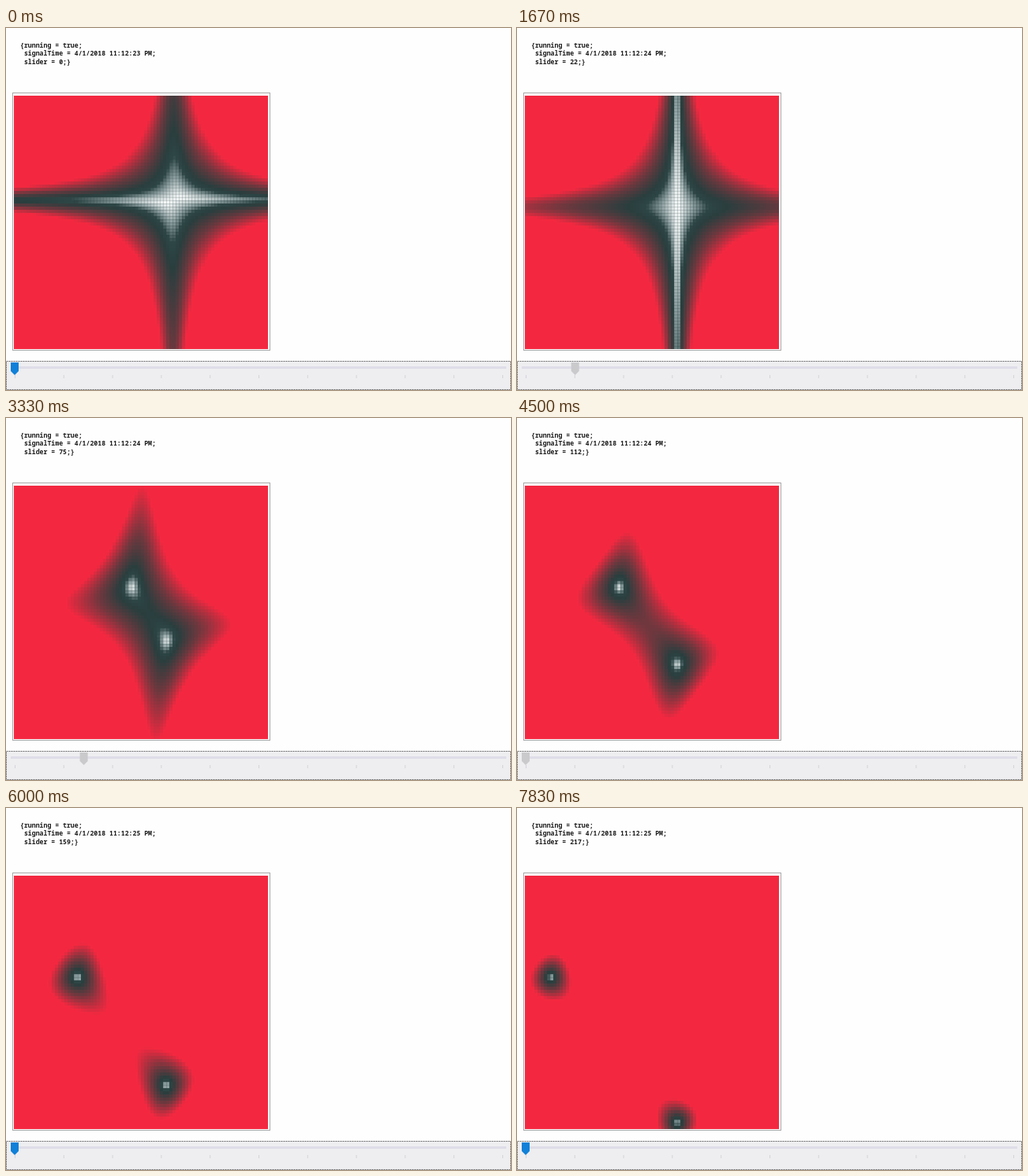
Animation of 640x460 px, one loop 8000 ms. Source, as an HTML page with a canvas:

```html
<!DOCTYPE html>
<html lang="en">
<meta charset="utf-8">
<title>Slider heat map</title>
<style>
html, body { margin: 0; width: 100%; height: 100%; overflow: hidden; background: #fefefe; }
canvas { position: absolute; left: 0; top: 0; }
pre {
  position: absolute; left: 18px; top: 16.5px; margin: 0; color: #1c1c1c;
  font: 600 8.2px/10.6px "Noto Sans Mono", "DejaVu Sans Mono", monospace;
}
</style>
<canvas width="640" height="460"></canvas>
<pre></pre>
<script>
const ctx = document.querySelector('canvas').getContext('2d');
const label = document.querySelector('pre');
const CELLS = 80, LEFT = 10, TOP = 86, SIZE = 322, CELL = SIZE / CELLS;
const RED = 'rgb(243,40,64)', LIMIT = 4750;
const RAMP = [
  [0, 250, 252, 252], [350, 140, 158, 160], [700, 46, 70, 70],
  [1100, 42, 62, 62], [2500, 108, 56, 62], [LIMIT, 243, 40, 64]
];

function heat(v) {
  const k = RAMP.findIndex(stop => stop[0] > v);
  const a = RAMP[k - 1], b = RAMP[k], p = (v - a[0]) / (b[0] - a[0]);
  return `rgb(${[1, 2, 3].map(c => Math.round(a[c] + (b[c] - a[c]) * p))})`;
}

function rect(color, x, y, w, h) {
  ctx.fillStyle = color;
  ctx.fillRect(x, y, w, h);
}

// Magnitude of a planar vector field with two rest points
function drawField(s) {
  const ax = 221 - 0.82 * s, by = 221.5 + 0.82 * s;
  ctx.strokeStyle = '#a8a8a8';
  ctx.strokeRect(8.5, 82.5, 326, 327);
  rect(RED, LEFT, TOP, SIZE, SIZE);
  for (let j = 0; j < CELLS; j++) {
    const top = Math.round(TOP + j * CELL);
    const h = Math.round(TOP + (j + 1) * CELL) - top;
    const y = TOP + (j + 0.5) * CELL;
    for (let i = 0; i < CELLS; i++) {
      const left = Math.round(LEFT + i * CELL);
      const w = Math.round(LEFT + (i + 1) * CELL) - left;
      const x = LEFT + (i + 0.5) * CELL;
      const v = Math.hypot((x - ax) * (y - by), (x - 203.2) * (y - 214.8));
      if (v >= LIMIT) continue;
      rect(heat(v), left, top, w, h);
      if (v < 700) {
        rect('rgba(30,50,50,.18)', left, top, w, 1);
        rect('rgba(30,50,50,.18)', left, top, 1, h);
      }
    }
  }
}

function drawSlider(x, pressed) {
  rect('#eeedf0', 0, 423, 640, 37);
  ctx.strokeStyle = '#6c6c6c';
  ctx.setLineDash([2, 1]);
  ctx.strokeRect(0.5, 423.5, 639, 36);
  ctx.setLineDash([]);
  rect('#dedde8', 6, 430, 628, 3);
  for (let i = 0; i <= 10; i++) rect('#d4d4d8', 11 + 61.8 * i, 441, 1, 4);
  ctx.fillStyle = pressed ? '#cacacc' : '#1080d8';
  ctx.beginPath();
  ctx.moveTo(x - 5, 425);
  ctx.lineTo(x + 5, 425);
  ctx.lineTo(x + 5, 436);
  ctx.lineTo(x, 441);
  ctx.lineTo(x - 5, 436);
  ctx.fill();
}

// The thumb eases out and back
function thumbX(t) {
  const u = Math.min(1, Math.abs(t - 2.6) / 1.75);
  return 11 + 140 * Math.cos(u * Math.PI / 2) ** 2;
}

let shown = -1;
function draw(now) {
  const step = Math.floor((now % 8000) * 6 / 1000 + 0.05);
  if (step !== shown) {
    shown = step;
    // The reported value lags behind the thumb: a slow start, then a steady climb
    const s = Math.max(step >> 1, Math.round(22.49 + 5.255 * (step - 10)));
    const second = s < 1 ? 23 : s < 154 ? 24 : 25;
    ctx.clearRect(0, 0, 640, 460);
    drawField(s);
    drawSlider(thumbX(step / 6), step >= 2 && step < 29);
    label.textContent =
      `{running = true;\n signalTime = 4/1/2018 11:12:${second} PM;\n slider = ${s};}`;
  }
  requestAnimationFrame(frame);
}

const start = performance.now();
function frame() { draw(performance.now() - start); }
frame();
</script>
</html>
```
